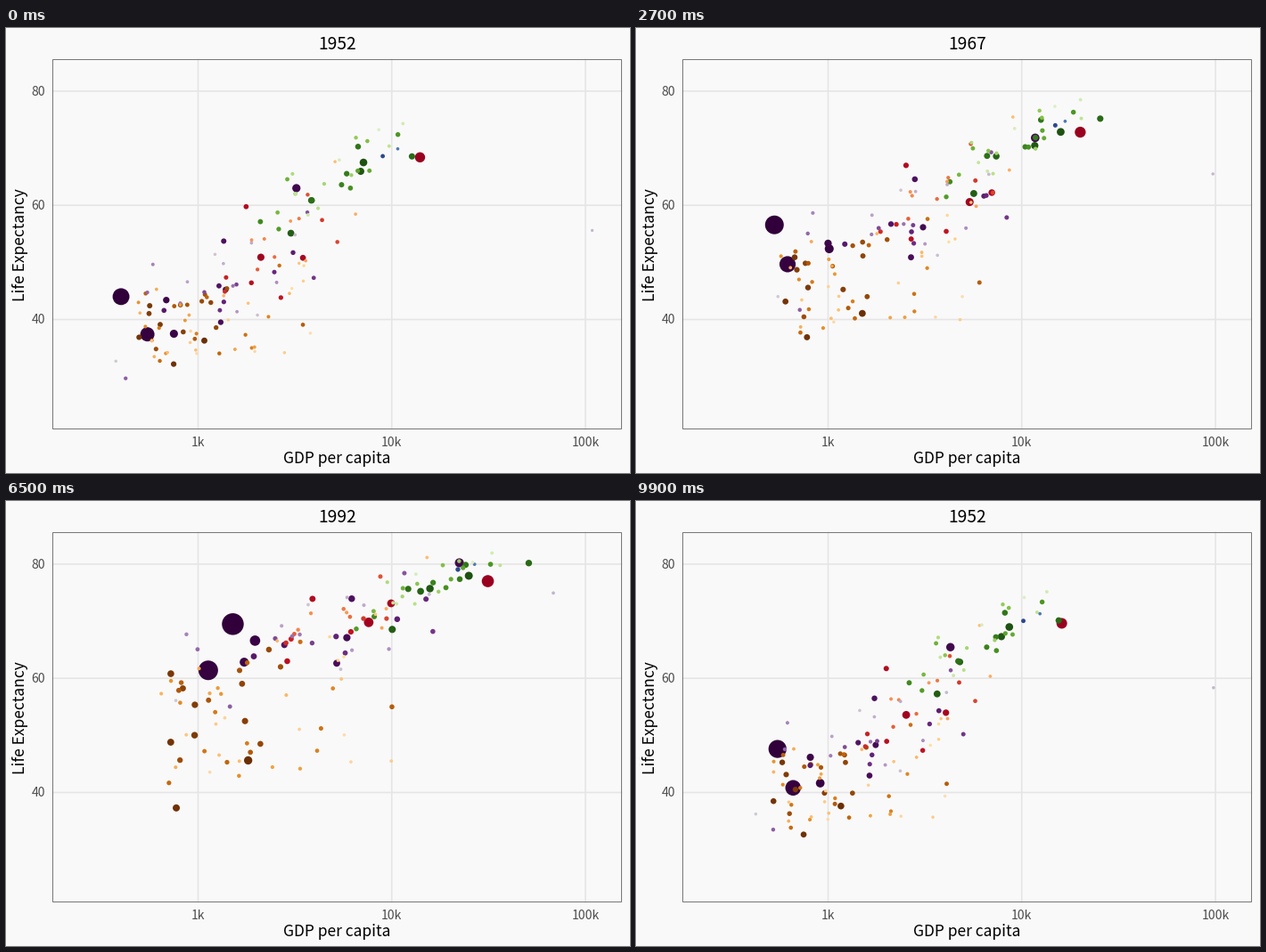
Write a matplotlib script that moves like this. It is 700x500 px and loops after 10000 ms.

```python
import matplotlib.pyplot as plt
import numpy as np
from matplotlib.animation import FuncAnimation
from matplotlib.colors import LinearSegmentedColormap

W, H, DPI = 700, 500, 100
FONT = "Noto Sans CJK JP"
LEFT, TOP, RIGHT, BOTTOM = 52.5, 35.5, 690.5, 450.5

STATES = np.arange(12)            # one state every five years from 1952
T = STATES / 11
STEPS = [8] + [9] * 4 + [8] * 7   # frames spent on each transition
STARTS = np.cumsum([0] + STEPS)

LIFE_EASE = 1 - (1 - T) ** 1.8    # fast gains first, then levelling off

rng = np.random.default_rng(7)


def blend(ends, ease):
    return ends[0] + (ends[1] - ends[0]) * ease


def giant(pop, income, life, power):
    """A large country: end values, with income growth eased by power."""
    gdp = blend(np.log10(income), T ** power)
    return gdp, blend(life, LIFE_EASE), np.geomspace(*pop, 12)


def drift(turn=np.linspace(0, .6, 12)):
    a, b = np.clip(rng.normal(size=2), -1.8, 1.8)
    return a * np.cos(turn) + b * np.sin(turn)


def small(share, top, growth, gdp, gdp_sd, age, age_sd, link, skew=0):
    """A country wandering slowly around its continent's trend."""
    z = drift()
    u = link * z + np.sqrt(1 - link ** 2) * drift()
    z = z + skew * (z ** 2 - 1)
    x = blend(gdp, T ** .7) + blend(gdp_sd, T) * z + rng.normal(0, .018, 12)
    y = blend(age, LIFE_EASE) + blend(age_sd, T) * u + rng.normal(0, .3, 12)
    start = top * np.exp(-4.2 * share)
    return x, np.minimum(y, 82), np.geomspace(start, start * growth, 12)


def crowd(count, **trend):
    return [small((i + .5) / count, **trend) for i in range(count)]


china = giant((556, 1319), (400, 4959), (44, 73), 1.75)
china[1][:] -= 8.5 * np.exp(-((STATES - 2) / .6) ** 2)   # famine years

asia = [
    china,
    giant((372, 1110), (547, 2452), (37.4, 64.7), 2),        # India
    giant((82, 224), (750, 3541), (37.5, 70.6), 1.3),        # Indonesia
    giant((86, 127), (3217, 31656), (63, 82.6), .45),        # Japan
    giant((41, 169), (685, 2606), (43.4, 65.5), 1),          # Pakistan
    giant((.2, 2.5), (108382, 47307), (55.6, 77.6), 1.6),    # Kuwait
] + crowd(27, top=30, growth=3, gdp=(3.15, 3.88), gdp_sd=(.32, .45),
          age=(47, 72), age_sd=(7, 4.8), link=.7)
americas = [
    giant((158, 301), (13990, 42952), (68.4, 78.2), .9),     # United States
    giant((57, 190), (2109, 9066), (50.9, 72.4), .35),       # Brazil
    giant((30, 109), (3478, 11978), (50.8, 76.2), .45),      # Mexico
] + crowd(22, top=18, growth=2.8, gdp=(3.48, 3.92), gdp_sd=(.21, .22),
          age=(53, 73.5), age_sd=(8, 3.4), link=.6)
europe = [
    giant((69, 82), (7144, 32170), (67.5, 79.4), .5),        # Germany
] + crowd(29, top=60, growth=1.25, gdp=(3.73, 4.38), gdp_sd=(.21, .19),
          age=(65, 77.8), age_sd=(4.8, 2.4), link=.8)
africa = [
    giant((33, 135), (1077, 2014), (36.3, 46.9), .5),        # Nigeria
] + crowd(51, top=24, growth=3.5, gdp=(2.99, 3.26), gdp_sd=(.24, .34),
          age=(39, 54.5), age_sd=(4.5, 8), link=.4, skew=.25)
oceania = crowd(2, top=20, growth=2.2, gdp=(4.01, 4.48), gdp_sd=(.01, .05),
                age=(69.2, 80.7), age_sd=(.2, .4), link=.5)

PALETTES = [
    (asia, ["#31003a", "#4a0d5a", "#6b2a80", "#9468ab", "#bda6cb", "#cfc9d2"]),
    (americas, ["#99001f", "#c1111f", "#e04a30", "#f78a4c", "#fdb667", "#fee09a"]),
    (europe, ["#1d5212", "#2f7519", "#4f9a24", "#86c148", "#b9e28a", "#dcefc5"]),
    (africa, ["#6b2f06", "#9a4a07", "#c4670c", "#e8912c", "#fdbb6b", "#fcdcae"]),
    (oceania, ["#2d4790", "#4d79b5"]),
]


def build():
    """All tracks as (country, quantity, state), largest first, with colours."""
    tracks, colors = [], []
    for group, shades in PALETTES:
        ramp = LinearSegmentedColormap.from_list("ramp", shades)
        tracks += sorted(group, key=lambda track: -track[2][-1])
        colors += [ramp(k) for k in np.linspace(0, 1, len(group))]
    data = np.array(tracks)
    order = np.argsort(-data[:, 2, -1])
    looped = np.concatenate([data, data[:, :, :1]], axis=2)
    return looped[order], np.array(colors)[order]


def x_px(log_gdp):
    return 215.5 + 217.25 * (log_gdp - 3)


def y_px(life):
    return 199.2 - 6.415 * (life - 60)


def diameter(pop):
    return 3 + 24.5 * np.sqrt(pop / 1319)


data, colors = build()

fig = plt.figure(figsize=(W / DPI, H / DPI), dpi=DPI, facecolor="#f9f9f9")
ax = fig.add_axes([0, 0, 1, 1])
ax.set(xlim=(0, W), ylim=(H, 0))
ax.axis("off")


def label(x, y, text, px, **style):
    style = {"ha": "center", "va": "baseline", "color": "black", **style}
    return ax.text(x, y, text, fontsize=px * 72 / DPI, family=FONT, **style)


def grid_line(xs, ys):
    ax.plot(xs, ys, color="#e5e5e5", lw=1.2, zorder=1, snap=False)


for power, text in ((3, "1k"), (4, "10k"), (5, "100k")):
    x = x_px(power)
    grid_line([x, x], [TOP, BOTTOM])
    label(x, 470, text, 14, color="#4d4d4d")
for life in (40, 60, 80):
    y = y_px(life)
    grid_line([LEFT, RIGHT], [y, y])
    label(44, y + 5, str(life), 14, ha="right", color="#4d4d4d")

dots = ax.scatter(np.zeros(len(data)), np.zeros(len(data)), c=colors,
                  linewidths=0, zorder=2)
ax.add_patch(plt.Rectangle((LEFT, TOP), RIGHT - LEFT, BOTTOM - TOP, fill=False,
                           ec="#7a7a7a", lw=.75, zorder=3, snap=False))
label(371.5, 489, "GDP per capita", 17.4)
label(25.5, 244, "Life Expectancy", 17.4, rotation=90, ha="right", va="center")
title = label(371.5, 24, "1952", 19.2)


def draw(frame):
    i = np.searchsorted(STARTS, frame, side="right") - 1
    t = (frame - STARTS[i]) / STEPS[i]
    gdp, life, pop = blend((data[:, :, i], data[:, :, i + 1]), t).T
    dots.set_offsets(np.column_stack([x_px(gdp), y_px(life)]))
    dots.set_sizes((diameter(pop) * 72 / DPI) ** 2)
    title.set_text(str(1952 + 5 * ((i + (t >= .5)) % 12)))
    return dots, title


anim = FuncAnimation(fig, draw, frames=100, interval=100, repeat=True,
                     repeat_delay=0, blit=False)
plt.show()
```
